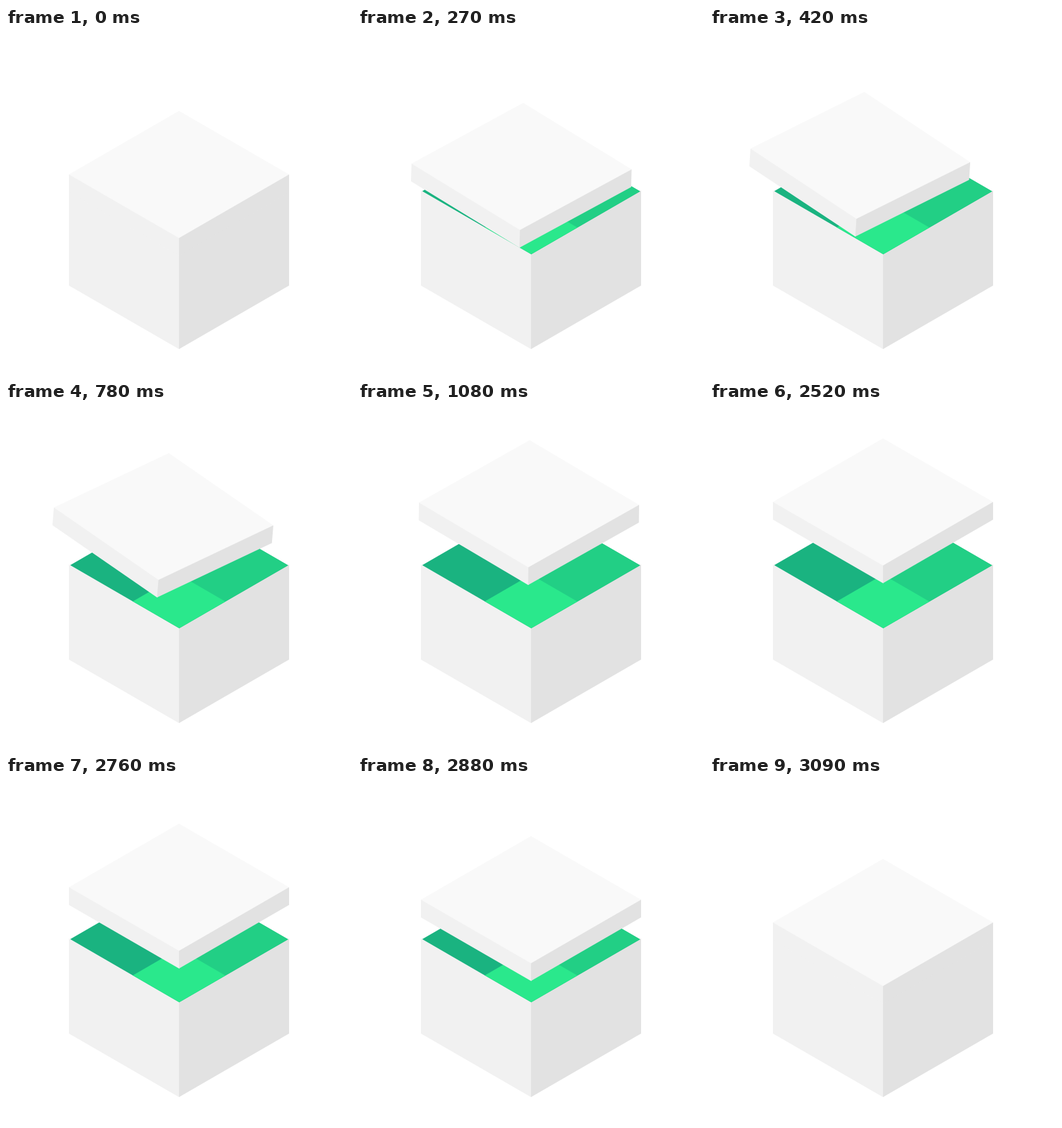
Write an HTML page with a canvas that moves like this. It is 528x528 px and loops after 3.6 s.

```html
<!DOCTYPE html>
<html lang="en">
<head>
<meta charset="utf-8">
<title>Opening box</title>
<style>
html, body { margin: 0; width: 100%; height: 100%; overflow: hidden; background: #fff; }
canvas { display: block; width: 100vw; height: 100vh; }
</style>
</head>
<body>
<canvas id="stage" width="528" height="528"></canvas>
<script>
const ctx = document.getElementById('stage').getContext('2d');
const LOOP = 3600, STEP = 30;
const TOP = '#f9f9f9', LEFT = '#f1f1f1', RIGHT = '#e2e2e2';
const CX = 264, W = 168, H = 97, LID = 27, REST = 223.4, LIFT = 71;

const powIn = n => u => u ** n;
const powOut = n => u => 1 - (1 - u) ** n;
const inOut = u => (1 - Math.cos(Math.PI * u)) / 2;

// Lid pose: time, x and y offset, tilt in degrees, easing towards this key
const keys = [
  [0, 0, 0, 0, inOut],
  [210, 0, 0, 0, inOut],
  [420, -34.6, -29, 3.55, powOut(1.6)],
  [687, -37.5, -35.4, 7.4, inOut],
  [1530, 0, -LIFT, 0, powOut(4)],
  [2490, 0, -LIFT, 0, inOut],
  [3035, 0, 0, 0, powIn(2)],
  [LOOP, 0, 0, 0, inOut]
];

function pose(t) {
  const i = keys.findIndex(k => k[0] > t);
  const a = keys[i - 1], b = keys[i];
  const e = b[4]((t - a[0]) / (b[0] - a[0]));
  return [1, 2, 3].map(j => a[j] + (b[j] - a[j]) * e);
}

function poly(color, ...pts) {
  ctx.fillStyle = color;
  ctx.beginPath();
  for (const [x, y] of pts) ctx.lineTo(x, y);
  ctx.closePath();
  ctx.fill();
}

function drawBox() {
  poly(LEFT, [96, 248], [264, 344], [265, 344], [265, 489.5], [264, 490], [96, 393]);
  poly(RIGHT, [432, 248], [264, 344], [264, 490], [432, 393]);

  ctx.save();
  ctx.beginPath();
  ctx.moveTo(98, 249);
  ctx.lineTo(264, 153);
  ctx.lineTo(430.5, 249.3);
  ctx.lineTo(264.3, 345.3);
  ctx.clip();
  ctx.fillStyle = '#1ab380';
  ctx.fillRect(90, 140, 350, 220);
  ctx.fillStyle = '#22cf85';
  ctx.fillRect(264, 140, 180, 220);
  poly('#2ae88c', [264, 263.5], [404, 344.5], [264, 425], [124, 344.5]);
  ctx.restore();
}

function drawLid([dx, dy, tilt]) {
  ctx.save();
  ctx.translate(CX + dx, REST + dy);
  ctx.rotate(tilt * Math.PI / 180);
  poly(LEFT, [-W, 0], [0, 0], [1, H], [1, H + LID - 0.6], [0, H + LID], [-W, LID]);
  poly(RIGHT, [W, 0], [0, 0], [0, H + LID], [W, LID]);
  poly(TOP, [0, -H], [W, 0], [0, H], [-W, 0]);
  ctx.restore();
}

const start = performance.now();

function frame() {
  const now = Math.max(0, performance.now() - start) % LOOP;
  const t = Math.floor(now / STEP) * STEP;
  ctx.fillStyle = '#fff';
  ctx.fillRect(0, 0, 528, 528);
  drawBox();
  drawLid(pose(t));
  requestAnimationFrame(frame);
}
frame();
</script>
</body>
</html>
```
